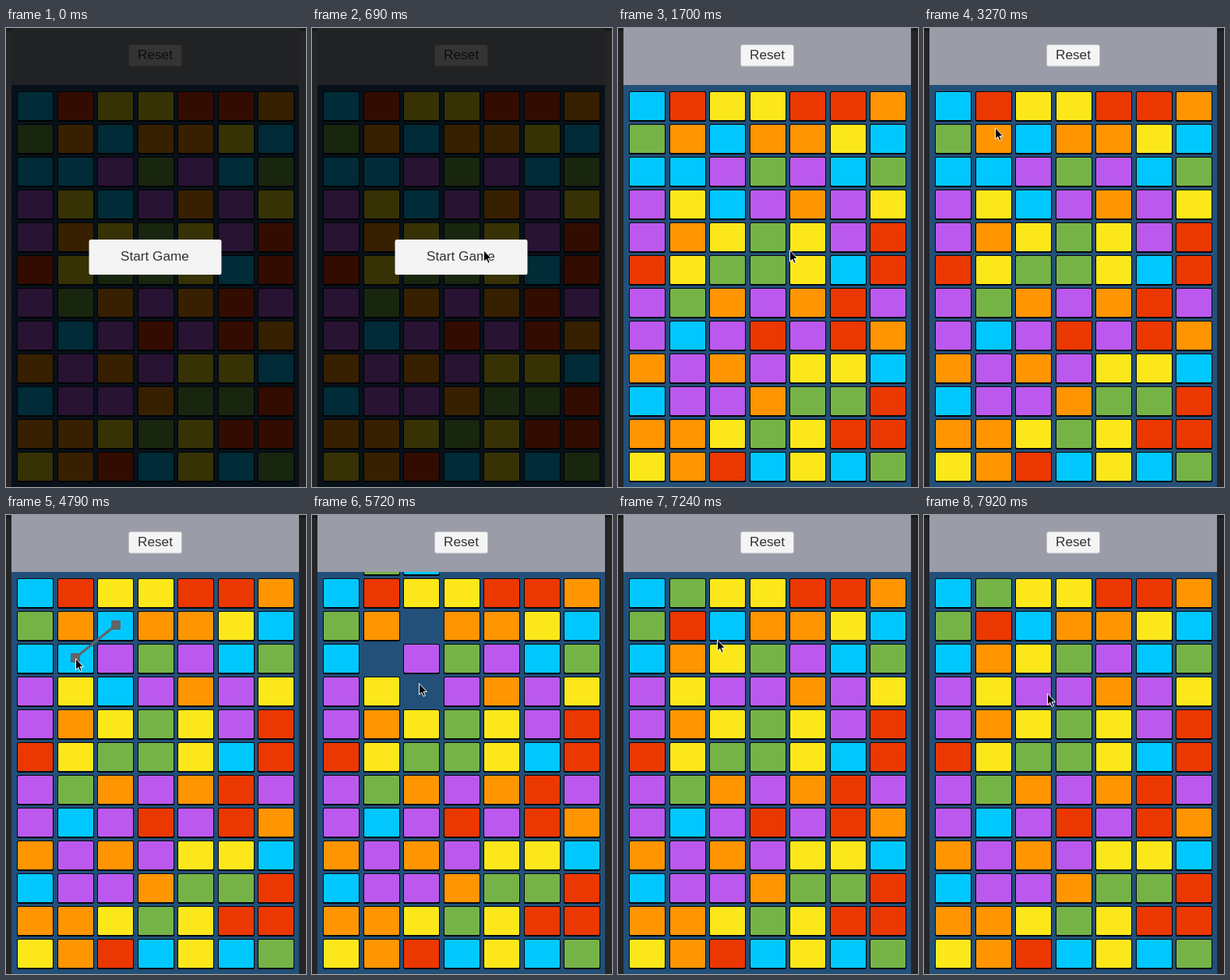
An HTML page that plays this animation: 385x588 px, repeating every 8000 ms.

```html
<!DOCTYPE html>
<html lang="en">
<head>
<meta charset="utf-8">
<title>Tile matching game</title>
<style>
  html, body { margin: 0; width: 100%; height: 100%; overflow: hidden; background: #252527; }
  svg { display: block; }
  text { font: 17.2px "Liberation Sans", Arial, sans-serif; fill: #323232; text-anchor: middle; }
</style>
</head>
<body>
<svg width="385" height="588" viewBox="0 0 385 588">
  <defs>
    <clipPath id="panel"><rect x="7" y="73" width="369" height="515"/></clipPath>
  </defs>
  <rect width="385" height="588" fill="#252527"/>
  <rect width="385" height="4" fill="#1a1a1b"/>
  <rect x="7" width="369" height="73" fill="#9a9ca8"/>
  <rect x="7" y="73" width="369" height="515" fill="#235079"/>

  <rect x="157.5" y="21.5" width="68" height="27.5" rx="2.5" fill="#f4f4f4" stroke="#c0c1c5"/>
  <text x="191.5" y="40">Reset</text>

  <g id="tiles" clip-path="url(#panel)"></g>
  <g id="chain" fill="#626466" stroke="#626466" stroke-width="3"></g>

  <g id="popup">
    <rect x="7" width="369" height="588" fill="#000" fill-opacity=".785"/>
    <rect id="start" x="106.5" y="271" width="170" height="45" rx="2.5"/>
    <text x="191" y="298">Start Game</text>
  </g>

  <path id="cursor" d="M.5 .8V15.2L3.8 12.2L6 17.4L8.3 16.4L6.1 11.4H10.4Z"
        fill="#000" stroke="#fff" stroke-linejoin="round"/>
</svg>
<script>
const LOOP = 8000, PRESS = 1590, OPEN = 1700, CLEAR = 5720, DROP = 6020;
const FRAME = 57;
const PITCH_X = 51.5, PITCH_Y = 42;

const COLORS = {
  B: '#00c8ff', R: '#eb3700', Y: '#fce81a',
  O: '#ff9500', G: '#76b347', P: '#bb59ee'
};
const BOARD = [
  'BRYYRRO', 'GOBOOYB', 'BBPGPBG', 'PYBPOPY', 'POYGYPR', 'RYGGYBR',
  'PGOPORP', 'PBPRPRO', 'OPOPYYB', 'BPPOGGR', 'OOYGYRR', 'YORBYBG'
];
// New tiles per column, lowest first
const SPAWNS = { 1: 'G', 2: 'BY' };
const LINKS = [
  { col: 2, row: 1, time: 4400 },
  { col: 1, row: 2, time: 4640 },
  { col: 2, row: 3, time: 5010 }
];

const $ = id => document.getElementById(id);
const show = (el, on) => el.setAttribute('visibility', on ? 'inherit' : 'hidden');

function add(parent, tag, attrs) {
  const el = document.createElementNS('http://www.w3.org/2000/svg', tag);
  for (const key in attrs) el.setAttribute(key, attrs[key]);
  return parent.appendChild(el);
}

// Each glide starts where the last one ended and bulges by (bendX, bendY) halfway
const glides = [];
let rest = [375, 258];
function glide(from, to, x, y, bendX = 0, bendY = 0) {
  glides.push({ from, to, a: rest, b: [x, y], bend: [bendX, bendY] });
  rest = [x, y];
}
glide(230, 690, 220, 284);
glide(1940, 2050, 214, 176, 10);
glide(2580, 2750, 183, 161);
glide(3040, 3270, 91, 127);
glide(3570, 3800, 49, 165, -8, -8);
glide(3857, 4090, 115, 150, 0, 20);
glide(4270, 4400, 130, 145);
glide(4457, 4790, 89, 183);
glide(4840, 5070, 129, 207);
glide(5130, 5300, 137, 215);
glide(6500, 6900, 231, 86, -10, -8);
glide(6957, 7300, 120, 180, -20, -15);
glide(7360, 7920, 158, 228, -38, 10);

function cursorAt(t) {
  const g = glides.filter(g => g.from <= t).pop();
  if (!g) return null;
  const u = Math.min(1, (t - g.from + FRAME) / (g.to - g.from + FRAME));
  const bulge = Math.sin(Math.PI * u);
  return g.a.map((v, i) => Math.round(v + (g.b[i] - v) * u + g.bend[i] * bulge));
}

function makeTile(color, col, row) {
  const el = add($('tiles'), 'g', {});
  add(el, 'rect', { width: 47, height: 39, rx: 2.5, fill: '#04070a' });
  add(el, 'rect', { x: 1, y: 1, width: 45, height: 36, rx: 1.5, fill: COLORS[color] });
  const linked = LINKS.some(l => l.col === col && l.row === row);
  const drop = LINKS.filter(l => l.col === col && l.row > row).length;
  return { el, col, row, linked, drop };
}

const tiles = BOARD.flatMap((line, row) => [...line].map((color, col) => makeTile(color, col, row)));
for (const col in SPAWNS) {
  [...SPAWNS[col]].forEach((color, i) => tiles.push(makeTile(color, +col, -1 - i)));
}

const center = ({ col, row }) => [Math.floor(38 + col * PITCH_X), 99 + row * PITCH_Y];

const links = LINKS.map((link, i) => {
  const el = add($('chain'), 'g', {});
  const [x, y] = center(link);
  add(el, 'rect', { x: x - 6, y: y - 6, width: 12, height: 12, stroke: 'none' });
  if (i) {
    const [x1, y1] = center(LINKS[i - 1]);
    add(el, 'line', { x1, y1, x2: x, y2: y });
  }
  return { el, time: link.time };
});

function draw(t) {
  for (const { el, col, row, linked, drop } of tiles) {
    const x = Math.round(14.3 + col * PITCH_X);
    const y = 81 + (row + (t >= DROP ? drop : 0)) * PITCH_Y;
    el.setAttribute('transform', `translate(${x} ${y})`);
    show(el, t < CLEAR ? row >= 0 : !linked);
  }
  for (const { el, time } of links) show(el, t >= time && t < CLEAR);

  show($('popup'), t < OPEN);
  $('start').setAttribute('fill', t < PRESS ? '#f4f4f4' : t < PRESS + 50 ? '#dcdcdc' : '#c3c3c3');

  const point = cursorAt(t);
  show($('cursor'), point);
  if (point) $('cursor').setAttribute('transform', `translate(${point})`);
}

const began = performance.now();
function frame() {
  draw((performance.now() - began) % LOOP);
  requestAnimationFrame(frame);
}
frame();
</script>
</body>
</html>
```
